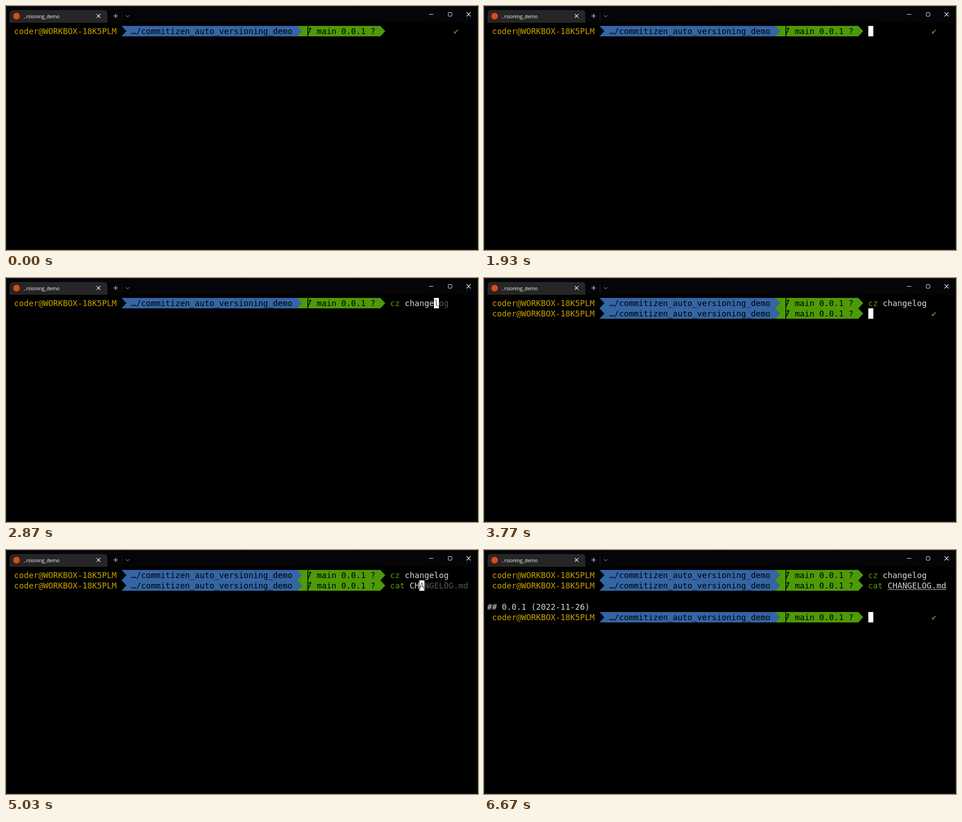
Recreate the animation shown at these times as an HTML page with a canvas. Size 1039x539 px, loop 8000 ms.

```html
<!DOCTYPE html>
<html lang="en">
<head>
<meta charset="utf-8">
<title>Terminal session</title>
<style>
  html, body { margin: 0; width: 100%; height: 100%; overflow: hidden; background: #000; }
  canvas { display: block; }
</style>
</head>
<body>
<canvas id="stage" width="1039" height="539"></canvas>
<script>
const ctx = document.getElementById('stage').getContext('2d');
const LOOP = 8000;
const CELL = 10.75, LEFT = 7, TOP = 43.5, ROW = 23.25;
const FONT = '17.86px "DejaVu Sans Mono", monospace';
const INPUT_COL = 78, CHECK_COL = 91;
const C = {
  yellow: '#c4a000', blue: '#3465a4', green: '#4e9a06', red: '#ef2929',
  text: '#d3d7cf', hint: '#555753', cursor: '#ffffff', bar: '#050508', tab: '#262626'
};

const colX = col => LEFT + col * CELL;
const rowY = row => Math.round(TOP + row * ROW);

// Times at which each further character of a command is visible
const FIRST = {
  row: 0, text: 'cz changelog', commandEnd: 2, entered: 3530,
  keys: [2000, 2130, 2270, 2400, 2530, 2630, 2730, 2770, 2860, 2960, 3090, 3220]
};
const SECOND = {
  row: 1, text: 'cat CHANGELOG.md', commandEnd: 3, entered: 5770,
  keys: [4170, 4350, 4500, 4620, 4870, 4960, 5050, 5130]
};
const CURSOR_SHOWN = 730;
const SECOND_PROMPT = 3650, RUN_SECOND = 5830, OUTPUT = 6530, LAST_PROMPT = 6630;

function text(str, col, row, color, bold) {
  ctx.font = (bold ? 'bold ' : '') + FONT;
  ctx.fillStyle = color;
  [...str].forEach((ch, i) => {
    if (ch !== ' ') ctx.fillText(ch, colX(col + i), TOP + row * ROW + 18.3);
  });
}

function polygon(color, ...points) {
  ctx.fillStyle = color;
  ctx.beginPath();
  points.forEach(([x, y]) => ctx.lineTo(x, y));
  ctx.fill();
}

function line(color, width, ...points) {
  ctx.strokeStyle = color;
  ctx.lineWidth = width;
  ctx.beginPath();
  points.forEach(([x, y], i) => i % 2 ? ctx.lineTo(x, y) : ctx.moveTo(x, y));
  ctx.stroke();
}

function cross(x, y, r) {
  line('#fff', 1.1, [x - r, y - r], [x + r, y + r], [x - r, y + r], [x + r, y - r]);
}

function cursor(col, row, under) {
  const y = rowY(row);
  ctx.fillStyle = C.cursor;
  ctx.fillRect(Math.round(colX(col)), y, 11, rowY(row + 1) - y);
  if (under) text(under, col, row, C.hint);
}

function branchIcon(x, y) {
  line('#000', 2, [x + 1.8, y + 1], [x + 1.8, y + 23]);
  ctx.lineWidth = 1.7;
  ctx.beginPath();
  ctx.moveTo(x + 2, y + 19);
  ctx.bezierCurveTo(x + 2, y + 13.5, x + 6.8, y + 15, x + 6.8, y + 9);
  ctx.lineTo(x + 6.8, y + 5);
  ctx.stroke();
  polygon('#000', [x + 3.6, y + 7], [x + 6.8, y + 3], [x + 10.2, y + 7]);
}

function prompt(row) {
  const top = rowY(row), bottom = rowY(row + 1), mid = (top + bottom) / 2;
  text('coder@WORKBOX-18K5PLM', 1, row, C.yellow);
  polygon(C.green, [colX(59), top], [colX(76), top], [colX(77), mid], [colX(76), bottom], [colX(59), bottom]);
  polygon(C.blue, [colX(23), top], [colX(59), top], [colX(60), mid], [colX(59), bottom], [colX(23), bottom], [colX(24), mid]);
  text('…/commitizen_auto_versioning_demo', 25, row, '#000');
  branchIcon(colX(61), top);
  text('main 0.0.1 ?', 63, row, '#000');
}

function command(cmd, t) {
  const { row, text: full, commandEnd, entered } = cmd;
  const done = t >= entered;
  const count = done ? full.length : cmd.keys.filter(k => t >= k).length;
  const typed = full.slice(0, count);
  const valid = count >= commandEnd;

  if (!count) text('✔', CHECK_COL, row, C.green);
  text(typed.slice(0, commandEnd), INPUT_COL, row, valid ? C.green : C.red, !valid);
  text(typed.slice(commandEnd), INPUT_COL + commandEnd, row, C.text);

  if (done) {
    if (cmd === SECOND) {
      ctx.fillStyle = C.text;
      ctx.fillRect(colX(82), rowY(row) + 20, 12 * CELL, 1);
    }
    return;
  }
  // A lone first letter suggests the longer command
  const source = count === 1 ? SECOND.text : full;
  const hint = count ? source.slice(count) : '';
  text(hint, INPUT_COL + count, row, C.hint);
  if (t >= CURSOR_SHOWN) cursor(INPUT_COL + count, row, hint[0]);
}

function windowFrame() {
  ctx.fillStyle = '#000';
  ctx.fillRect(0, 0, 1039, 539);
  ctx.fillStyle = C.bar;
  ctx.fillRect(1, 1, 1037, 36);
  ctx.strokeStyle = '#292930';
  ctx.lineWidth = 1;
  ctx.beginPath();
  ctx.roundRect(0.5, 0.5, 1038, 538, 7);
  ctx.stroke();

  ctx.fillStyle = C.tab;
  ctx.beginPath();
  ctx.roundRect(8, 9, 215, 28, [7, 7, 0, 0]);
  ctx.fill();
  ctx.fillStyle = '#dd4814';
  ctx.beginPath();
  ctx.arc(23.3, 22.3, 7.4, 0, Math.PI * 2);
  ctx.fill();
  ctx.font = '10.6px "Open Sans", sans-serif';
  ctx.fillStyle = '#fff';
  ctx.fillText('..rsioning_demo', 39, 26.8);

  cross(203.7, 22, 4);
  line('#fff', 1, [236.5, 22], [246, 22], [241.5, 17], [241.5, 27]);
  line('#25252b', 1, [255.5, 13], [255.5, 31]);
  line('#ccc', 1, [264, 20.5], [267.7, 24], [267.7, 24], [271.4, 20.5]);
  line('#fff', 1, [931, 18.5], [940.5, 18.5]);
  ctx.beginPath();
  ctx.roundRect(973.5, 14.5, 8, 8, 1.2);
  ctx.stroke();
  cross(1018.3, 18.5, 4.5);
}

function draw(t) {
  windowFrame();
  prompt(0);
  command(FIRST, t);
  if (t >= FIRST.entered && t < SECOND_PROMPT) cursor(0, 1);
  if (t >= SECOND_PROMPT) {
    prompt(1);
    command(SECOND, t);
  }
  if (t >= RUN_SECOND && t < OUTPUT) cursor(0, 2);
  if (t >= OUTPUT) {
    text('## 0.0.1 (2022-11-26)', 0, 3, C.text);
    if (t < LAST_PROMPT) cursor(0, 4);
  }
  if (t >= LAST_PROMPT) {
    prompt(4);
    text('✔', CHECK_COL, 4, C.green);
    cursor(INPUT_COL, 4);
  }
}

const start = performance.now();
function tick() {
  draw((performance.now() - start) % LOOP);
  requestAnimationFrame(tick);
}
tick();
</script>
</body>
</html>
```
